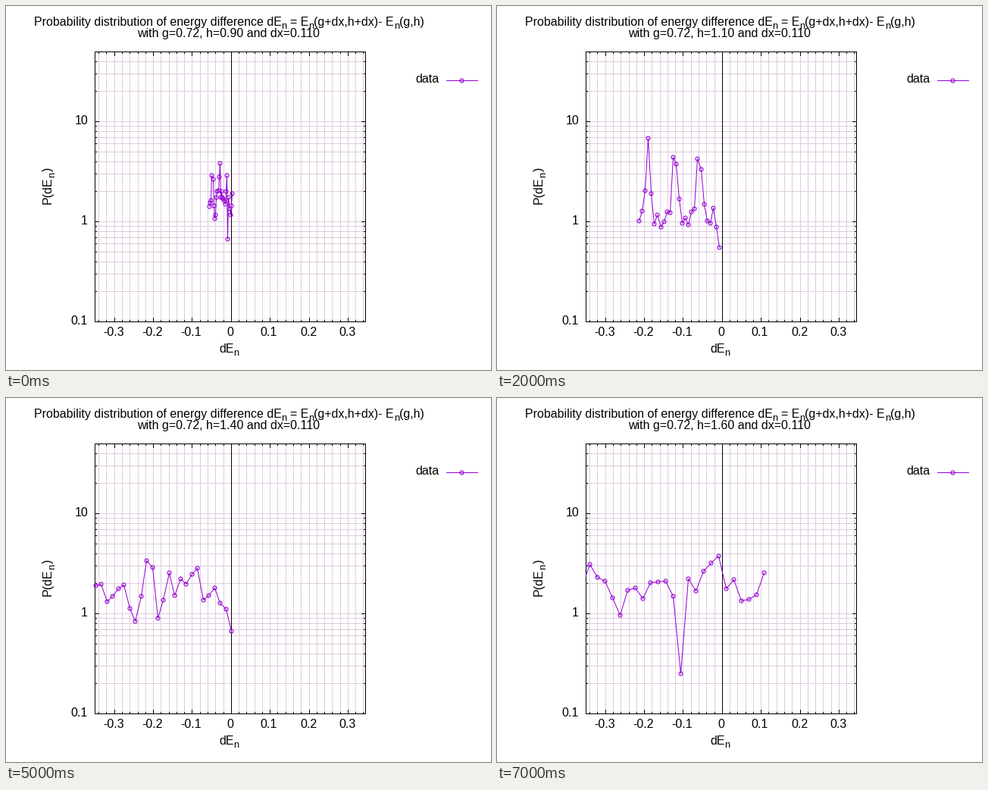
Animation, 640 px wide and 480 px high, one loop 8 s. Source, as a matplotlib script:

```python
import numpy as np
import matplotlib.pyplot as plt
from matplotlib.animation import FuncAnimation
from matplotlib.patches import Rectangle

W, H, DPI = 640, 480, 80
PX = 72 / DPI                       # one pixel in points
LEFT, RIGHT, TOP, BOTTOM = 117, 474, 60, 416
X_MIN, X_MAX = -0.35, 0.345
Y_MIN, Y_MAX = 0.1, 50
BINS = 27
VIOLET, GRID = "#9400d3", "#ddccdd"

plt.rcParams["font.family"] = "Liberation Sans"
fig = plt.figure(figsize=(W / DPI, H / DPI), dpi=DPI, facecolor="white")
ax = fig.add_axes([0, 0, 1, 1])
ax.set(xlim=(0, W), ylim=(H, 0))
ax.axis("off")


def x_px(v):
    return round(LEFT + (v - X_MIN) / (X_MAX - X_MIN) * (RIGHT - LEFT))


def y_px(v):
    span = np.log10(Y_MAX / Y_MIN)
    return round(BOTTOM - np.log10(v / Y_MIN) / span * (BOTTOM - TOP))


def line(x, y, color="black", z=3):
    """Straight one-pixel line, snapped to the pixel grid."""
    ax.plot(x, y, color=color, lw=PX, antialiased=False, snap=True,
            solid_capstyle="butt", solid_joinstyle="miter", zorder=z)


def dots(x, y):
    return ax.plot(x, y, "o", mfc="none", mec=VIOLET, ms=5 * PX,
                   mew=1.1 * PX, zorder=6)[0]


def label(x, y, s, size=16, ha="left", rotation=0):
    return ax.text(x - 1, y - 1, s, fontsize=size * PX, ha=ha, va="baseline",
                   rotation=rotation, rotation_mode="anchor")


def sub(x, y, rotation=0):
    label(x, y, "n", 12.8, rotation=rotation)


def x_tick(v, size):
    x = x_px(v)
    line([x, x], [TOP, BOTTOM], GRID, z=1)
    line([x, x], [TOP, TOP + size])
    line([x, x], [BOTTOM - size, BOTTOM])


def y_tick(v, size):
    y = y_px(v)
    line([LEFT, RIGHT], [y, y], GRID, z=1)
    line([LEFT, LEFT + size], [y, y])
    line([RIGHT - size, RIGHT], [y, y])


# grid, ticks and frame
for i in range(-17, 18):
    x_tick(i / 50, 5 if i % 5 == 0 else 2)
for i in range(-3, 4):
    label(x_px(i / 10), 436, f"{i / 10:g}", ha="center")
for decade in (0.1, 1, 10):
    for m in range(1, 10):
        if m * decade <= Y_MAX:
            y_tick(m * decade, 5 if m == 1 else 2)
    label(109, y_px(decade) + 5, f"{decade:g}", ha="right")
line([LEFT, RIGHT, RIGHT, LEFT, LEFT], [TOP, TOP, BOTTOM, BOTTOM, TOP])
line([x_px(0)] * 2, [TOP, BOTTOM])

# titles
label(38, 27, "Probability distribution of energy difference dE")
sub(364, 31)
label(376, 27, "= E")
sub(400.4, 31)
label(407.5, 27, "(g+dx,h+dx)- E")
sub(513, 31)
label(520.2, 27, "(g,h)")
subtitle = label(174, 42, "")
label(282, 458, "dE")
sub(301.5, 462)
label(61, 262, "P(dE", rotation=90)
sub(65, 227, 90)
label(61, 219.5, ")", rotation=90)

# key
label(541, 102, "data")
line([581, 622], [98, 98], VIOLET)
dots([601], [98])


def histogram(i, first, last, base, gain, jitter, dip, lowest):
    """Evenly spaced bins: a comb of peaks, seeded jitter and one deep dip."""
    k = np.arange(BINS)
    gap = (k - 3.2 + 4.1) % 8.2 - 4.1          # bins to the nearest peak
    noise = np.random.default_rng(i).normal(size=BINS).clip(-1.6, 1.6)
    y = base - gain * np.exp(-(gap / 1.2) ** 2) + jitter * noise
    y = np.minimum(y, lowest - 2)
    y[dip] = lowest
    return np.round(np.linspace(first, last, BINS)), np.round(y)


# first x, last x, base, peak height, jitter, dip bin, dip y (pixels)
SHAPES = [
    (268, 298, 262, 42, 14, 21, 307),
    (239, 297, 272, 62, 15, 16, 317),
    (187, 293, 280, 86, 14, 26, 318),
    (243, 292, 285, 80, 16, 25, 323),
    (222, 294, 280, 60, 18, 24, 324),
    (103, 297, 262, 26, 20, 26, 307),
    (109, 463, 262, 26, 24, 26, 321),
    (92, 352, 262, 28, 18, 15, 363),
]
runs = [histogram(i, *shape) for i, shape in enumerate(SHAPES)]

curve, = ax.plot([], [], color=VIOLET, lw=PX, zorder=5)
points = dots([], [])
curve.set_clip_path(Rectangle((LEFT, TOP), RIGHT - LEFT + 1, BOTTOM - TOP + 1,
                              transform=ax.transData))


def draw(i):
    x, y = runs[i]
    inside = x >= LEFT
    curve.set_data(x + 0.5, y + 0.5)
    points.set_data(x[inside], y[inside])
    subtitle.set_text(f"with g=0.72, h={0.9 + i / 10:.2f} and dx=0.110")
    return curve, points, subtitle


anim = FuncAnimation(fig, draw, frames=len(runs), interval=1000, repeat=True)
plt.show()
```
